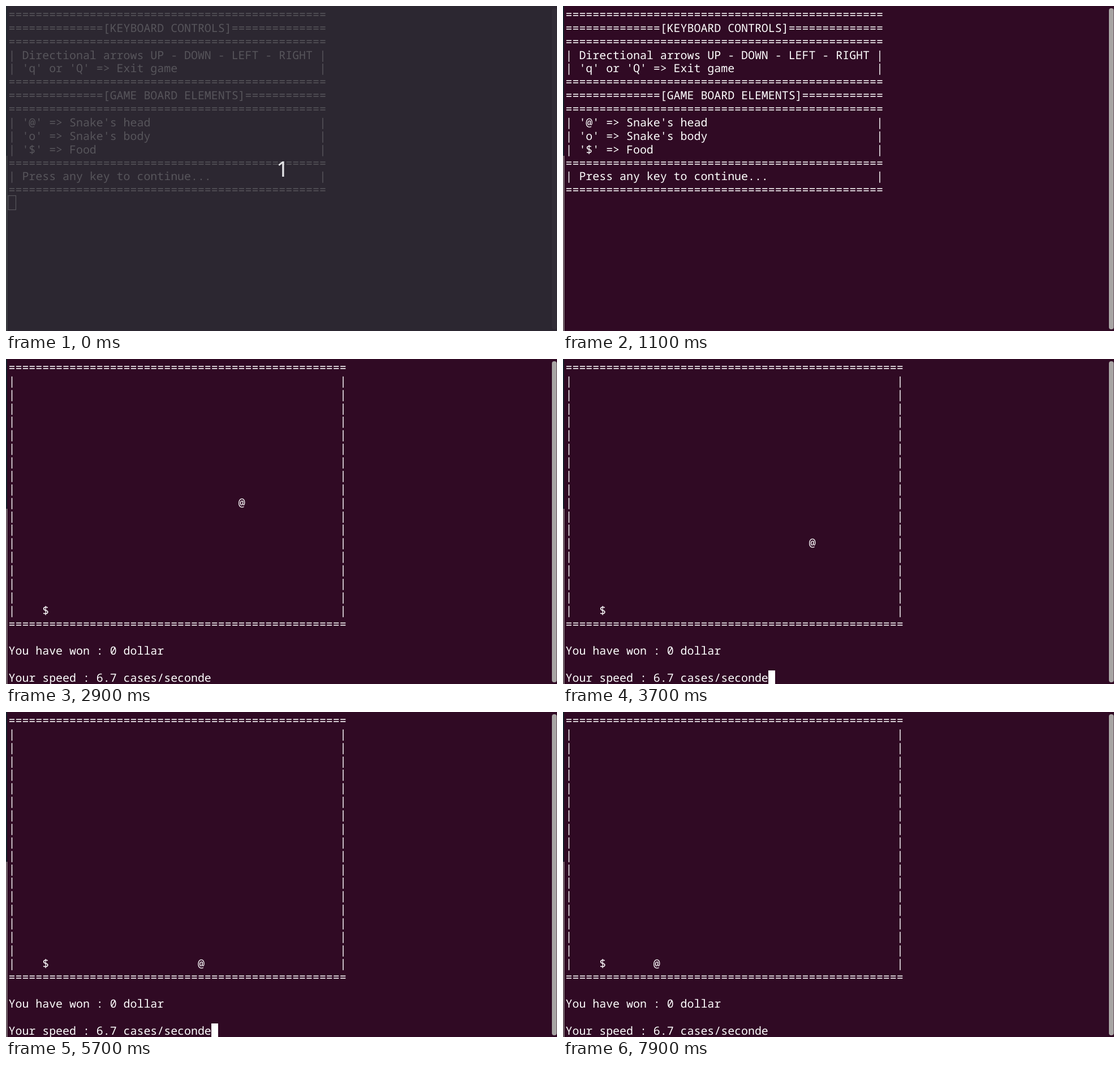
Animation, 974 px wide and 575 px high, one loop 8000 ms. Source, as an HTML page:

```html
<!DOCTYPE html>
<html lang="en">
<head>
<meta charset="utf-8">
<title>Terminal snake</title>
<style>
  html, body { margin: 0; width: 100%; height: 100%; overflow: hidden; background: #300a24; }
  svg { display: block; width: 974px; height: 575px; }
  text { white-space: pre; font-variant-ligatures: none; text-rendering: geometricPrecision; }
  #screen { font: 19.915px "Noto Sans Mono", "DejaVu Sans Mono", monospace; }
  #count { font: 38px "Noto Sans", sans-serif; }
</style>
</head>
<body>
<svg viewBox="0 0 974 575">
  <rect id="bg" width="974" height="575"/>
  <rect id="edgeTop" width="2" height="265"/>
  <rect id="edgeLow" x="1" y="265" width="1.2" height="310"/>
  <rect id="thumb" x="965" y="4" width="8.5" height="568" rx="4"/>
  <g id="screen">
    <g id="menu"></g>
    <g id="game"></g>
    <text id="head">@</text>
  </g>
  <rect id="cursor"/>
  <text id="count" x="478" y="302" fill="#e6e6e8">1</text>
</svg>
<script>
const LOOP = 8000, CELL = 11.949, LINE = 23.87, LEFT = 4.5, TOP = 2;
const GAME_START = 1800, FOCUS = 500;
const el = id => document.getElementById(id);
const colX = c => LEFT + c * CELL;
const rowY = r => TOP + r * LINE;

function set(node, attrs) {
  for (const k in attrs) node.setAttribute(k, attrs[k]);
}
const show = (node, on) => set(node, { visibility: on ? "visible" : "hidden" });

function place(node, col, row) {
  set(node, { x: colX(col), y: rowY(row) + 20 });
}

function print(parent, col, row, str) {
  const t = document.createElementNS("http://www.w3.org/2000/svg", "text");
  t.textContent = str;
  place(t, col, row);
  parent.appendChild(t);
}

const rule = n => "=".repeat(n);
const boxed = s => "| " + s.padEnd(44) + "|";
const titled = s => (rule(14) + "[" + s + "]").padEnd(47, "=");

[
  rule(47), titled("KEYBOARD CONTROLS"), rule(47),
  boxed("Directional arrows UP - DOWN - LEFT - RIGHT"),
  boxed("'q' or 'Q' => Exit game"),
  rule(47), titled("GAME BOARD ELEMENTS"), rule(47),
  boxed("'@' => Snake's head"),
  boxed("'o' => Snake's body"),
  boxed("'$' => Food"),
  rule(47), boxed("Press any key to continue..."), rule(47)
].forEach((s, row) => print(el("menu"), 0, row, s));

const game = el("game");
for (const row of [0, 19]) print(game, 0, row, rule(50));
for (let row = 1; row < 19; row++) {
  print(game, 0, row, "|");
  print(game, 49, row, "|");
}
print(game, 5, 18, "$");
print(game, 0, 21, "You have won : 0 dollar");
print(game, 0, 23, "Your speed : 6.7 cases/seconde");

// Times, in tenths of a second, at which the head advances one cell
const moves = [
  19, 20, 22, 24, 25, 26, 28, 29, 31, 32,
  34, 35, 37, 39, 40, 41, 43, 45,
  46, 47, 49, 50, 52, 53, 55, 56, 58, 59, 61, 62, 64, 65,
  67, 69, 70, 72, 73, 75, 76, 77, 79
];
const RIGHT = 10, DOWN = 8;

// Cursor toggles; a key press restarts the 600 ms blink
const blinks = [11, 17, 24, 30, 39, 45, 51, 57, 63, 69, 75];

const passed = (list, t) => list.filter(s => s * 100 <= t).length;
const clamp = (v, hi) => Math.max(0, Math.min(v, hi));

function headCell(t) {
  const n = passed(moves, t);
  return {
    col: 26 + clamp(n, RIGHT) - clamp(n - RIGHT - DOWN, 99),
    row: 10 + clamp(n - RIGHT, DOWN)
  };
}

const looks = {
  dim:   { bg: "#2c2731", ink: "#57555b", top: "#222a30", low: "#4c5552", thumb: "#322d37" },
  idle:  { bg: "#380c28", ink: "#ffffff", top: "#14222b", low: "#c3cbc0", thumb: "#3e1630" },
  focus: { bg: "#300a24", ink: "#ffffff", top: "#14222b", low: "#b5beb2", thumb: "#a8a5a4" }
};

function drawCursor(t, ink, playing) {
  const hollow = t < FOCUS;
  const x = playing ? colX(30) : colX(0) - 0.5;
  const y = rowY(playing ? 23 : 14);
  set(el("cursor"), hollow
    ? { x: 4, y: 335.5, width: 13.4, height: 25, fill: "none", stroke: ink, "stroke-width": 1.2 }
    : { x, y, width: playing ? 12 : 13, height: 24, fill: ink, stroke: "none" });
  show(el("cursor"), passed(blinks, t) % 2 === 0);
}

function draw(t) {
  const look = t < 100 ? looks.dim : t < FOCUS ? looks.idle : looks.focus;
  const playing = t >= GAME_START;
  set(el("bg"), { fill: look.bg });
  set(el("edgeTop"), { fill: look.top });
  set(el("edgeLow"), { fill: look.low });
  set(el("thumb"), { fill: look.thumb });
  set(el("screen"), { fill: look.ink });
  show(el("menu"), !playing);
  show(game, playing);
  show(el("head"), playing);
  show(el("count"), t < 100);
  const { col, row } = headCell(t);
  place(el("head"), col, row);
  drawCursor(t, look.ink, playing);
}

const start = performance.now();
function tick() {
  draw((performance.now() - start) % LOOP);
  requestAnimationFrame(tick);
}
draw(0);
requestAnimationFrame(tick);
</script>
</body>
</html>
```
